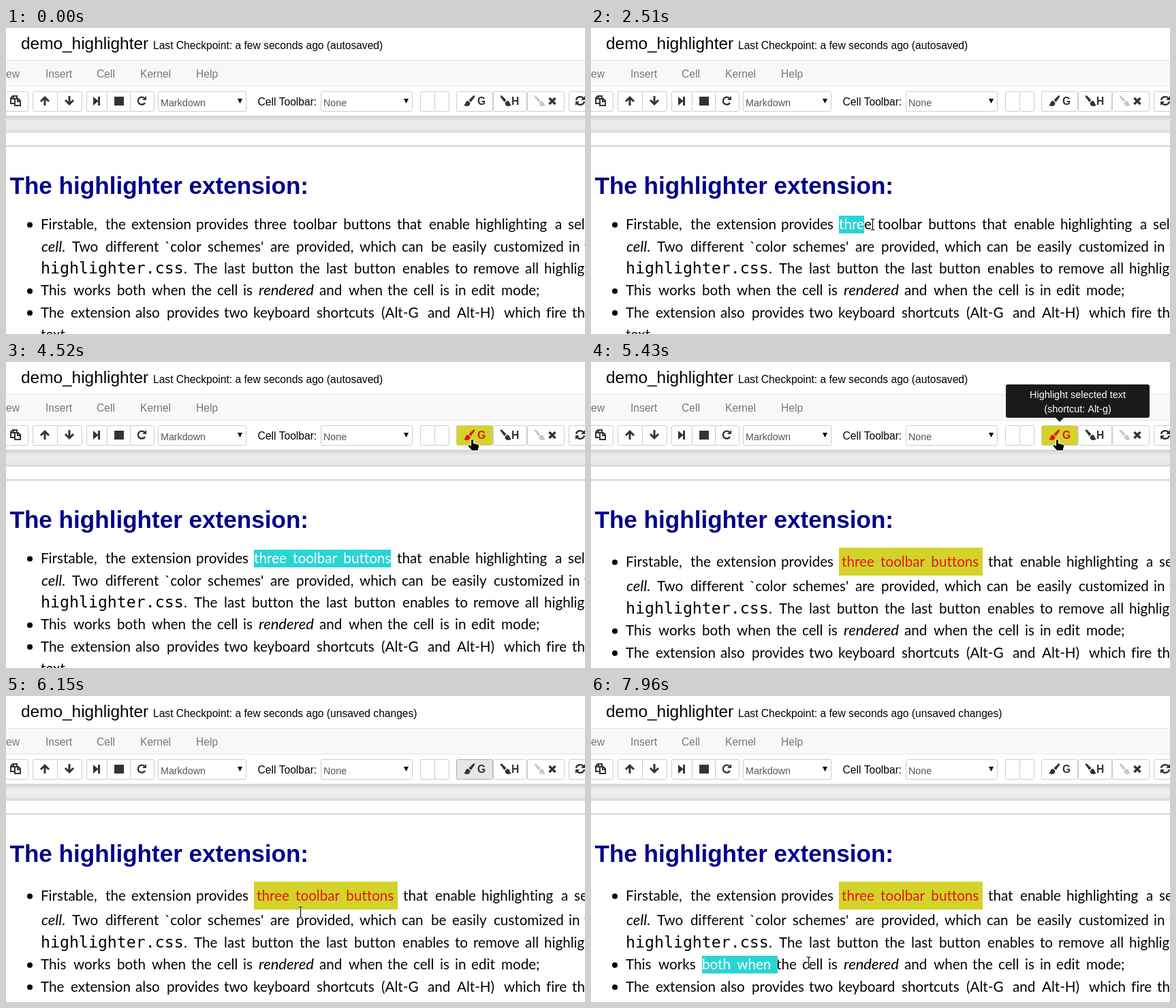
Write an HTML page with a canvas that moves like this. It is 850 px wide and 450 px high and loops after 8000 ms.

```html
<!DOCTYPE html>
<html lang="en">
<head>
<meta charset="utf-8">
<title>Highlighter demo</title>
<style>
  html, body { margin: 0; width: 100%; height: 100%; overflow: hidden; background: #fff; }
  canvas { display: block; }
</style>
</head>
<body>
<canvas id="stage" width="850" height="450"></canvas>
<script>
const ctx = document.getElementById('stage').getContext('2d');
const LOOP = 8000, HIGHLIGHT = 5430, UNSAVED = 5490, LEAVE = 5990, DRAG2 = 7520;
const YELLOW = '#d3d32a', RED = '#e5161c', CYAN = '#2ad4d4', DARK = '#333';
const BODY = '20.6px Lato, sans-serif', ITALIC = 'italic 22px Lato, sans-serif';
const MONO = '23.2px "DejaVu Sans Mono", monospace';
const ui = (size, weight = 400) => `${weight} ${size}px "Liberation Sans", Arial, sans-serif`;

const PHRASE = 'three toolbar buttons';
const lines = [
  [[51, 'Firstable,'], [146, 'the'], [184, 'extension'], [279, 'provides'], [574, 'that'], [621, 'enable'],
   [689, 'highlighting'], [806, 'a'], [825, 'selected']],
  [[52, 'cell', ITALIC], [82, '.'], [97, 'Two'], [146, 'different'], [233, '`color'], [296, "schemes'"],
   [388, 'are'], [426, 'provided,'], [519, 'which'], [581, 'can'], [624, 'be'], [655, 'easily'],
   [716, 'customized'], [826, 'in'], [849, 'the']],
  [[51, 'highlighter.css', MONO], [261, '.'], [276, 'The'], [320, 'last'], [361, 'button'], [431, 'the'],
   [470, 'last'], [511, 'button'], [582, 'enables'], [659, 'to'], [686, 'remove'], [762, 'all'],
   [790, 'highlighting']],
  [[51, 'This'], [99, 'works'], [163, 'both'], [214, 'when'], [272, 'the'], [310, 'cell'], [348, 'is'],
   [371, 'rendered', ITALIC], [460, 'and'], [503, 'when'], [560, 'the'], [598, 'cell'], [637, 'is'],
   [659, 'in'], [683, 'edit'], [727, 'mode;']],
  [[51, 'The'], [95, 'extension'], [190, 'also'], [236, 'provides'], [320, 'two'], [363, 'keyboard'],
   [456, 'shortcuts'], [551, '(Alt-G'], [619, 'and'], [662, 'Alt-H)'], [731, 'which'], [793, 'fire'], [831, 'the']],
  [[51, 'text.']]
];

// Pointer path: time, x, y
const path = [
  [950, 457, 462], [1150, 425, 385], [1350, 385, 320], [1630, 359, 294], [1760, 359, 294],
  [1950, 365, 290], [2110, 363, 292], [2270, 363, 292], [2500, 410, 289], [2800, 500, 290],
  [3070, 559, 295], [3110, 562, 296], [3420, 571, 297], [3710, 571, 297], [3850, 500, 270],
  [3960, 477, 225], [4150, 530, 165], [4350, 650, 130], [4470, 688, 117], [4520, 685, 114],
  [5949, 685, 114], [5950, 663, 132], [6150, 433, 318], [6400, 290, 410], [6550, 235, 423],
  [6750, 197, 407], [7270, 163, 394], [7520, 163, 394], [7880, 272, 392], [7960, 319, 392]
];

const brush = new Path2D('M14 .5q3-1 2 2L10.5 10 7.500 7zM6.500 8l3 3q0 5-5 5-3 0-4.500-2 2 0 2.200-2 .8-4 4.300-4z');
const arrow = new Path2D('M0 0V15l3.500-3.200 2.500 5.500 2.600-1.100-2.400-5.400H11z');
const hand = new Path2D('M-2 1q1.500-2 3 0V6l7 1.500q1.500.5 1 3L7.500 16H-1L-6 10q-1-2 1-2l3 2z');
const beam = new Path2D('M-3-8H-1L0-7 1-8H3M0-7V7M-3 8H-1L0 7 1 8H3');

const clamp = v => Math.max(0, Math.min(1, v));

function pointer(t) {
  const i = path.findIndex(p => p[0] > t);
  if (i < 0) return path[path.length - 1].slice(1);
  if (i === 0) return path[0].slice(1);
  const [t0, x0, y0] = path[i - 1], [t1, x1, y1] = path[i];
  const k = (t - t0) / (t1 - t0);
  return [x0 + (x1 - x0) * k, y0 + (y1 - y0) * k];
}

function text(str, x, y, font, color = '#000', align = 'left') {
  ctx.font = font;
  ctx.fillStyle = color;
  ctx.textAlign = align;
  ctx.fillText(str, x, y);
}

// A trace of letter spacing turns ligatures off
function bodySpacing(on) {
  ctx.wordSpacing = on ? '4px' : '0px';
  ctx.letterSpacing = on ? '0.02px' : '0px';
}

function bodyText(str, x, y, font = BODY, color = '#000') {
  bodySpacing(true);
  text(str, x, y, font, color);
  bodySpacing(false);
}

function rect(x, y, w, h, color) {
  ctx.fillStyle = color;
  ctx.fillRect(x, y, w, h);
}

function box(x0, x1, fill = '#fff', border = '#ccc') {
  ctx.beginPath();
  ctx.roundRect(x0 + .5, 93.5, x1 - x0, 29, 2);
  ctx.fillStyle = fill;
  ctx.fill();
  ctx.strokeStyle = border;
  ctx.lineWidth = 1;
  ctx.stroke();
}

function shape(d, x, y, color = DARK, flip = 1) {
  ctx.save();
  ctx.translate(x, y);
  ctx.scale(flip, 1);
  ctx.fillStyle = color;
  ctx.fill(typeof d === 'string' ? new Path2D(d) : d);
  ctx.restore();
}

function line(d, x, y, width, color = DARK) {
  ctx.save();
  ctx.translate(x, y);
  ctx.lineWidth = width;
  ctx.strokeStyle = color;
  ctx.stroke(typeof d === 'string' ? new Path2D(d) : d);
  ctx.restore();
}

function header(t) {
  rect(0, 0, 850, 450, '#fff');
  text('demo_highlighter', 22, 31, ui(24.4));
  const state = t < UNSAVED ? 'autosaved' : 'unsaved changes';
  text(`Last Checkpoint: a few seconds ago (${state})`, 216, 31, ui(15.6));
  rect(0, 47, 850, 39, '#e7e7e7');
  rect(0, 48, 850, 37, '#f8f8f8');
  text('View', 20, 73, ui(15.6), '#777', 'right');
  [['Insert', 58], ['Cell', 133], ['Kernel', 197], ['Help', 279]]
    .forEach(([name, x]) => text(name, x, 73, ui(15.6), '#777'));
  const shade = ctx.createLinearGradient(0, 129, 0, 154);
  [[0, '#d2d2d2'], [.35, '#ececec'], [.75, '#ebebeb'], [1, '#d8d8d8']]
    .forEach(([at, color]) => shade.addColorStop(at, color));
  rect(0, 129, 850, 25, shade);
  rect(0, 173, 850, 1, '#ababab');
}

function toolbar(t) {
  const hover = t >= 4390 && t < LEAVE, focus = t >= LEAVE && t < DRAG2;
  [[-10, 32], [39, 75], [75, 111], [118, 148], [148, 182], [182, 217], [223, 352], [462, 596],
   [608, 629], [629, 650], [715, 764], [765, 819], [826, 870]].forEach(([a, b]) => box(a, b));
  box(661, 714, hover ? YELLOW : focus ? '#e6e6e6' : '#fff', focus ? '#adadad' : '#ccc');

  line('M6 12H1V4L4 1H10V4M5 1V5H1M7 5H12L15 8V15H7zM11 5V9H15', 6, 99, 2);
  line('M-6 1L0-5 6 1M0-4V7', 57, 107, 3);
  line('M-6-1L0 5 6-1M0 4V-7', 93, 107, 3);
  shape('M0 0L7 6V0H10V13H7V7L0 13z', 128, 101);
  shape('M0 0H14V13H0z', 159, 101);
  line('M4-4A5.500 5.500 0 1 0 5 3', 199, 107, 2.4);
  shape('M7-7V-1H1z', 199, 107);
  line('M-6-1A6 6 0 0 1 5-3M6 1A6 6 0 0 1-5 3', 843, 107, 2.4);
  shape('M7-7V-1H1zM-7 7V1H-1z', 843, 107);

  const ink = hover ? RED : DARK;
  shape(brush, 672, 99, ink);
  text('G', 692, 113, ui(15.6, 700), ink);
  shape(brush, 742, 99, DARK, -1);
  text('H', 742, 113, ui(15.6, 700), DARK);
  shape(brush, 792, 99, '#c8c8c8', -1);
  line('M-4.500-4.500L4.500 4.500M-4.500 4.500L4.500-4.500', 802, 107.5, 3.4);

  text('Markdown', 227, 115, ui(14.3), '#555');
  text('None', 466, 115, ui(14.3), '#555');
  text('Cell Toolbar:', 369.5, 114, ui(15.6));
  [340, 584].forEach(x => shape('M0 0H7L3.500 7z', x, 104, '#000'));
}

// Selection snaps to the character boundary nearest to the pointer
function selection(str, x, y, target) {
  ctx.font = BODY;
  bodySpacing(true);
  let width = 0;
  for (let i = 1; i <= str.length; i++) {
    const next = ctx.measureText(str.slice(0, i)).width;
    if (target - x < (width + next) / 2) break;
    width = next;
  }
  bodySpacing(false);
  if (!width) return;
  ctx.save();
  ctx.beginPath();
  ctx.rect(x, y - 20, Math.round(width), 26);
  ctx.clip();
  rect(x, y - 20, 300, 26, CYAN);
  bodyText(str, x, y, BODY, '#fff');
  ctx.restore();
}

function notebook(t) {
  const marked = t >= HIGHLIGHT;
  const baseline = i => i === 0 ? (marked ? 301 : 296)
    : marked ? 337 + 32.6 * (i - 1) : 329 + 32.2 * (i - 1);
  text('The highlighter extension:', 5.5, 244, ui(35.1, 700), '#00008b');
  lines.forEach((words, i) => words.forEach(([x, str, font]) => {
    const shift = marked && i === 0 && x > 570 ? 9 : 0;
    bodyText(str, x + shift, Math.round(baseline(i)), font);
  }));
  [0, 3, 4].forEach(i => {
    ctx.beginPath();
    ctx.arc(35, baseline(i) - 6.5, 4, 0, 7);
    ctx.fillStyle = '#000';
    ctx.fill();
  });

  const lagged = pointer(t - 80)[0];
  if (marked) {
    rect(364, 273, 211, 41, YELLOW);
    bodyText(PHRASE, 368, 301, BODY, RED);
  } else {
    bodyText(PHRASE, 364, 296);
    if (t >= 2270) selection(PHRASE, 364, 296, t < 3420 ? lagged : 600);
  }
  if (t >= DRAG2) selection('both when the cell is', 163, 402, lagged);
}

function tooltip(t) {
  ctx.globalAlpha = clamp((t - 4770) / 120) * clamp((6110 - t) / 120);
  ctx.beginPath();
  ctx.roundRect(609, 33, 211, 49, 3);
  ctx.fillStyle = '#1a1a1a';
  ctx.fill();
  shape('M-6 0H6L0 6z', 688, 82, '#1a1a1a');
  text('Highlight selected text', 714.5, 53, ui(14.4), '#fff', 'center');
  text('(shortcut: Alt-g)', 714.5, 74, ui(14.4), '#fff', 'center');
  ctx.globalAlpha = 1;
}

function cursor(t) {
  if (t < 950) return;
  const [x, y] = pointer(t).map(Math.round);
  if (y > 205) {
    line(beam, x + .5, y, 3, '#fff');
    line(beam, x + .5, y, 1.2, '#000');
    return;
  }
  const onButton = x >= 661 && x <= 714 && y >= 93 && y <= 122;
  const icon = onButton ? hand : arrow;
  line(icon, x, y, 2, '#fff');
  shape(icon, x, y, '#000');
}

function draw(now) {
  const t = now % LOOP;
  header(t);
  toolbar(t);
  notebook(t);
  tooltip(t);
  cursor(t);
  requestAnimationFrame(draw);
}
requestAnimationFrame(draw);
</script>
</body>
</html>
```
